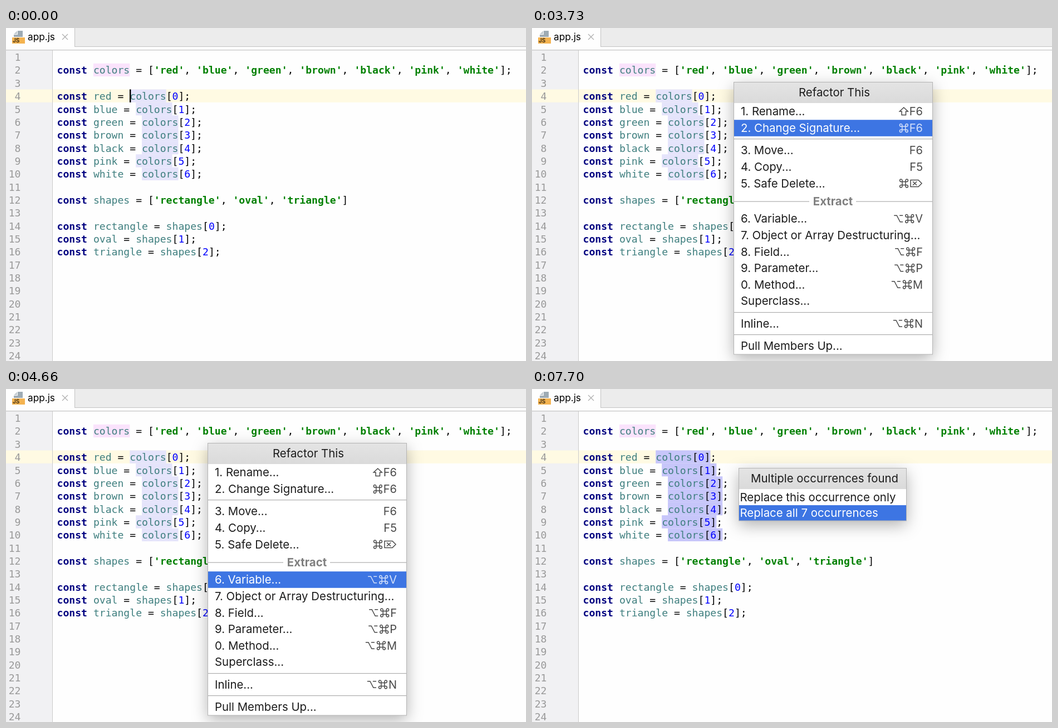
An HTML page that plays this animation: 934x599 px, repeating every 8 s.

```html
<!DOCTYPE html>
<html lang="en">
<head>
<meta charset="utf-8">
<style>
html, body { margin: 0; width: 100%; height: 100%; overflow: hidden; background: #fefefe; }
svg { display: block; width: 934px; height: 599px; }
text { white-space: pre; }
.code { font: 18.1px "DejaVu Sans Mono", monospace; fill: #000; }
.key { font-weight: bold; fill: #000080; }
.str { font-weight: bold; fill: #008000; }
.num { fill: #0000ff; }
.name { fill: #3f7f7f; }
.line { fill: #999; text-anchor: end; }
.ui { font: 20.4px Inter, sans-serif; fill: #1c1c1c; }
.mid { text-anchor: middle; }
.hint { fill: #484848; text-anchor: end; font-size: 20px; }
.glyph { fill: none; stroke: #484848; stroke-width: 1.5; }
.panel { fill: #fff; filter: drop-shadow(0 8px 14px rgba(0, 0, 0, .3)); }
.bar { fill: none; }
.on .bar { fill: #3d75e3; }
.on .ui { fill: #fff; }
.on .hint { fill: #d5e1fa; }
.on .glyph { stroke: #d5e1fa; }
</style>
</head>
<body>
<svg id="stage" viewBox="0 0 934 599">
  <defs>
    <linearGradient id="head" x2="0" y2="1">
      <stop stop-color="#e4e4e4"/><stop offset="1" stop-color="#dadada"/>
    </linearGradient>
  </defs>
</svg>
<script>
const stage = document.getElementById('stage');
const CHAR = 10.9, LEFT = 91.5, ROW = 23.35;
const rowTop = n => 40.4 + (n - 1) * ROW;

function add(parent, tag, attrs, text) {
  const el = document.createElementNS('http://www.w3.org/2000/svg', tag);
  for (const k in attrs) el.setAttribute(k, attrs[k]);
  if (text !== undefined) el.textContent = text;
  parent.append(el);
  return el;
}
const rect = (parent, x, y, width, height, fill) =>
  add(parent, 'rect', { x, y, width, height, fill });
const label = (parent, x, y, text, cls) =>
  add(parent, 'text', { x, y, class: cls }, text);
const show = (el, on) => el.setAttribute('visibility', on ? 'visible' : 'hidden');

// Tab bar and gutter
rect(stage, 0, 0, 934, 599, '#fefefe');
rect(stage, 123, 0, 811, 34, '#ececec');
rect(stage, 123, 33, 811, 1, '#c3c3c3');
rect(stage, 123, 0, 1, 34, '#c3c3c3');
rect(stage, 0, 40, 83, 559, '#f1f1f3');
rect(stage, 0, rowTop(4), 934, ROW, '#fffae3');
rect(stage, 0, 39, 934, 1.3, '#c6c6c6');
rect(stage, 83, 40, 1, 559, '#cbcbcb');
add(stage, 'path', { d: 'M21 5H30V16H14V12H21Z', fill: '#9eabb4' });
add(stage, 'path', { d: 'M14 11L20 5V11Z', fill: '#c4ccd2' });
rect(stage, 11, 17, 23, 11, '#f4b350');
label(stage, 12, 26.3, 'JS', '').setAttribute('style', 'font: bold 10px Inter, sans-serif; fill: #4a3717');
label(stage, 39, 22, 'app.js', 'ui').setAttribute('style', 'font-size: 17.2px; fill: #000');
add(stage, 'path', { d: 'M101 11l10 10m0-10l-10 10', stroke: '#b0b0b0', 'stroke-width': 1.3 });

// Code
const quote = words => words.split(' ').map(w => `'${w}'`).join(', ');
const colors = 'red blue green brown black pink white';
const shapes = 'rectangle oval triangle';
const pick = (words, list) => words.split(' ').map((w, i) => `const ${w} = ${list}[${i}];`);
const lines = ['', `const colors = [${quote(colors)}];`, '', ...pick(colors, 'colors'), '',
  `const shapes = [${quote(shapes)}]`, '', ...pick(shapes, 'shapes')];

const kind = s => s === 'const' ? 'key' : s[0] === "'" ? 'str' : /\d/.test(s) ? 'num' : /[a-z]/.test(s) ? 'name' : '';
const marks = add(stage, 'g', {});
const selections = [];
for (let n = 1; n <= 24; n++) {
  const y = rowTop(n) + 18.7, line = lines[n - 1] || '';
  label(stage, 26.5, y, n, 'code line');
  const at = line.indexOf('colors');
  if (at >= 0) {
    const x = LEFT + at * CHAR;
    rect(marks, x, rowTop(n), 6 * CHAR, ROW, n === 2 ? '#fae3fc' : '#e5e4fb');
    if (n > 2) selections.push(rect(marks, x, rowTop(n), 9 * CHAR, ROW, '#c7c6fa'));
  }
  const text = label(stage, LEFT, y, '', 'code');
  for (const part of line.match(/const|'[^']*'|\d|[a-z]+|[^a-z'\d]+/g) || [])
    add(text, 'tspan', { class: kind(part) }, part);
}
const caret = rect(stage, 222, rowTop(4), 2.4, ROW, '#000');

// Popups
function popup(x, y, w, h, headH, title, titleX) {
  const g = add(stage, 'g', {});
  add(g, 'rect', { x, y, width: w, height: h, rx: 1, class: 'panel' });
  rect(g, x, y, w, headH, 'url(#head)');
  label(g, titleX, y + headH / 2 + 7, title, 'ui mid');
  return g;
}
function frame(g, x, y, width, height) {
  add(g, 'rect', { x, y, width, height, fill: 'none', stroke: '#b4b4b4' });
}
function item(g, x, w, mid, h, textX, text) {
  const row = add(g, 'g', {});
  add(row, 'rect', { x, y: mid - h / 2, width: w, height: h, class: 'bar' });
  label(row, textX, mid + 7.2, text, 'ui');
  return row;
}

const glyphs = {
  '⌘': 'M-3-5.2V5.2A2.2 2.2 0 1 1-5.2 3H5.2A2.2 2.2 0 1 1 3 5.2V-5.2A2.2 2.2 0 1 1 5.2-3H-5.2A2.2 2.2 0 1 1-3-5.2Z',
  '⌥': 'M-8-5.8H-3L3 5.8H8M2-5.8H8',
  '⇧': 'M0-7L7.5 0H3.7V6.5H-3.7V0H-7.5Z',
  '⌦': 'M-10-6H4L10 0L4 6H-10Z M-6-3.2L1 3.2M1-3.2L-6 3.2'
};
function hint(row, mid, keys) {
  const plain = keys.replace(/[^A-Z0-9]/g, '');
  let x = 702;
  if (plain) x -= label(row, x, mid + 7.2, plain, 'ui hint').getComputedTextLength();
  for (const c of [...keys].reverse()) {
    if (!glyphs[c]) continue;
    const half = c === '⌦' ? 12 : 10;
    x -= half;
    add(row, 'path', { d: glyphs[c], class: 'glyph', transform: `translate(${x} ${mid})` });
    x -= half;
  }
}

const menu = popup(362.5, 97.5, 357, 489.5, 37.5, 'Refactor This', 543);
const menuRows = [
  [150, '1. Rename...', '⇧F6'], [180, '2. Change Signature...', '⌘F6'],
  [220, '3. Move...', 'F6'], [250, '4. Copy...', 'F5'], [279.5, '5. Safe Delete...', '⌘⌦'],
  [343, '6. Variable...', '⌥⌘V'], [373, '7. Object or Array Destructuring...', ''],
  [402.5, '8. Field...', '⌥⌘F'], [432, '9. Parameter...', '⌥⌘P'], [461.5, '0. Method...', '⌥⌘M'],
  [491, 'Superclass...', ''], [531.5, 'Inline...', '⌥⌘N'], [572, 'Pull Members Up...', '']
].map(([mid, text, keys]) => {
  const row = item(menu, 363, 356, mid, 29.6, 375, text);
  hint(row, mid, keys);
  return row;
});
for (const [x, y, w] of [[363, 199, 356], [363, 511, 356], [363, 551, 356], [363, 311.5, 135], [582, 311.5, 137]])
  rect(menu, x, y, w, 1.2, '#adadad');
label(menu, 540.5, 319, 'Extract', 'ui mid').setAttribute('style', 'font-weight: 700; fill: #808080');
frame(menu, 362.5, 97.5, 357, 489.5);

const chooser = popup(371.5, 142.5, 301, 94.5, 37.5, 'Multiple occurrences found', 525.5);
const choices = ['Replace this occurrence only', 'Replace all 7 occurrences']
  .map((text, i) => item(chooser, 372, 300.5, 195 + 28 * i, 28, 373.5, text));
frame(chooser, 371.5, 142.5, 301, 94.5);

// Timeline
const OPEN = 2130, CHOOSE = 5830, ALL = 7700;
const steps = [3730, 3960, 4200, 4430, 4660, 4900];
const select = (rows, index) => rows.forEach((r, i) => r.setAttribute('class', i === index ? 'on' : ''));
const start = performance.now();

function draw() {
  const t = (performance.now() - start) % 8000;
  show(caret, t < OPEN && Math.floor((t + 240) / 500) % 2 === 0);
  show(menu, t >= OPEN && t < CHOOSE);
  show(chooser, t >= CHOOSE);
  select(menuRows, steps.filter(s => t >= s).length);
  select(choices, t >= ALL ? 1 : 0);
  selections.forEach((s, i) => show(s, t >= (i ? ALL : CHOOSE)));
  requestAnimationFrame(draw);
}
draw();
</script>
</body>
</html>
```
